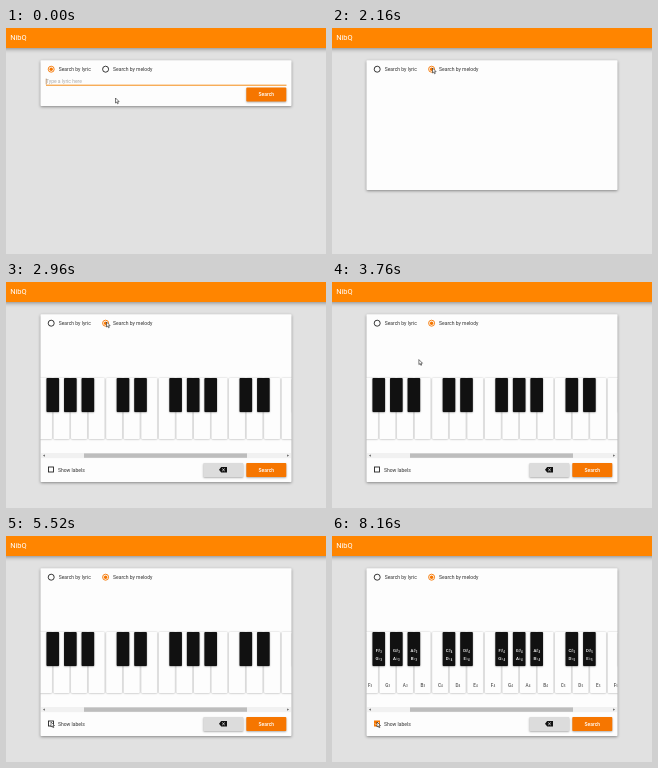
Animation, 320 px wide and 226 px high, one loop 8240 ms. Source, as an HTML page with a canvas:

```html
<!DOCTYPE html>
<html lang="en">
<head>
<meta charset="utf-8">
<title>Melody search</title>
<style>
html, body { margin: 0; width: 320px; height: 226px; overflow: hidden; background: #e1e1e1; }
canvas { display: block; width: 320px; height: 226px; }
</style>
</head>
<body>
<canvas id="stage"></canvas>
<script>
const LOOP = 8240, STEP = 80;
const ORANGE = '#f67600', INK = '#333';
const MELODY = 2160, READY = 2480, CHECKED = 5840, LABELED = 5920;
const KEY = 17.55, KEY_TOP = 96, KEY_BOTTOM = 157;
const NOTES = ['C', 'D', 'E', 'F', 'G', 'A', 'B'];

// Pointer tip: time, x, y
const PATH = [
  [0, 109.5, 70], [640, 109.5, 70], [1280, 102.3, 45.5], [1600, 100.5, 40],
  [3440, 100.5, 40], [4400, 48, 185], [4720, 48, 185], [5280, 45, 186]
];

const canvas = document.getElementById('stage');
const c = canvas.getContext('2d');
const dpr = Math.max(1, window.devicePixelRatio || 1);
canvas.width = 320 * dpr;
canvas.height = 226 * dpr;

const clamp = v => Math.max(0, Math.min(1, v));
const ease = v => v * v * (3 - 2 * v);

function rect(x, y, w, h, fill) {
  c.fillStyle = fill;
  c.fillRect(x, y, w, h);
}

function raised(x, y, w, h, fill, blur = 3, alpha = 0.4, dy = 1) {
  c.save();
  c.shadowColor = `rgba(0,0,0,${alpha})`;
  c.shadowBlur = blur * dpr;
  c.shadowOffsetY = dy * dpr;
  c.beginPath();
  c.roundRect(x, y, w, h, 0.8);
  c.fillStyle = fill;
  c.fill();
  c.restore();
}

function text(s, x, y, fill = INK, size = 5, align = 'left', weight = 400) {
  c.font = `${weight} ${size}px Roboto, sans-serif`;
  c.textAlign = align;
  c.fillStyle = fill;
  c.fillText(s, x, y);
}

function shape(points, fill, stroke, width = 0.6) {
  c.beginPath();
  points.forEach(([x, y]) => c.lineTo(x, y));
  c.closePath();
  if (fill) { c.fillStyle = fill; c.fill(); }
  if (stroke) { c.strokeStyle = stroke; c.lineWidth = width; c.stroke(); }
}

function line(points, color, width) {
  c.beginPath();
  points.forEach(([x, y]) => c.lineTo(x, y));
  c.strokeStyle = color;
  c.lineWidth = width;
  c.stroke();
}

function radio(x, label, on) {
  c.beginPath();
  c.arc(x, 41.2, 3, 0, 7);
  c.strokeStyle = on ? ORANGE : '#222';
  c.lineWidth = 0.9;
  c.stroke();
  if (on) {
    c.beginPath();
    c.arc(x, 41.2, 1.7, 0, 7);
    c.fillStyle = ORANGE;
    c.fill();
  }
  text(label, x + 7.5, 43.2);
}

function searchButton(y) {
  raised(240.3, y, 40, 14, ORANGE, 2, 0.3);
  text('Search', 260.3, y + 8.8, '#fff', 5, 'center', 500);
}

function lyricForm(t) {
  const fade = clamp((t - 160) / 320);
  text('Type a lyric here', 40, 55, '#aaa');
  rect(40, 56.7, 240.5, 1 - 0.3 * fade, `rgba(246,140,20,${1 - 0.25 * fade})`);
  if (t % 1060 < 530) rect(39.8, 50.6, 0.7, 5.8, '#a8733c');
  searchButton(59.6);
}

function noteLabel(letter, sign, octave, x, y, fill, size) {
  const name = letter + sign;
  c.font = `500 ${size}px Roboto, sans-serif`;
  const w = c.measureText(name).width;
  text(name, x - w / 2 - 0.8, y, fill, size, 'left', 500);
  text(octave, x + w / 2 - 0.7, y + 0.9, fill, size * 0.65, 'left', 500);
}

function piano(alpha, shift, labeled) {
  c.save();
  c.beginPath();
  c.rect(34.5, 90, 251, 78);
  c.clip();
  c.globalAlpha = alpha;
  for (let k = -1; k < 16; k++) {
    const x = 38 + shift + k * KEY;
    raised(x - KEY / 2 + 0.7, KEY_TOP, KEY - 1.4, KEY_BOTTOM - KEY_TOP, '#fdfdfd', 1.8, 0.35, 0.3);
    if (labeled) noteLabel(NOTES[(k + 10) % 7], '', 3 + Math.floor((k + 3) / 7), x, 150.5, '#555', 4.6);
  }
  for (let k = -1; k < 15; k++) {
    const n = (k + 10) % 7;
    if (n === 2 || n === 6) continue;
    const x = 38 + shift + (k + 0.5) * KEY;
    const octave = 3 + Math.floor((k + 3) / 7);
    raised(x - 6.3, KEY_TOP, 12.6, 34, '#111', 1.5, 0.45, 0.5);
    if (labeled) {
      noteLabel(NOTES[n], '♯', octave, x, 116.3, '#fff', 4.3);
      noteLabel(NOTES[n + 1], '♭', octave, x, 123.8, '#fff', 4.3);
    }
  }
  c.restore();
}

function footer(checked) {
  rect(35, 171, 250, 5.2, '#f1f1f1');
  rect(78, 171.4, 163, 4.4, '#bdbdbd');
  shape([[37, 173.6], [38.8, 172.4], [38.8, 174.8]], '#555');
  shape([[283, 173.6], [281.2, 172.4], [281.2, 174.8]], '#555');

  if (checked) {
    rect(42, 184.5, 6, 6, ORANGE);
    line([[43.1, 187.5], [44.5, 189], [47, 186]], '#fff', 0.8);
  } else {
    c.strokeStyle = '#222';
    c.lineWidth = 0.9;
    c.strokeRect(42.5, 185, 5, 5);
  }
  text('Show labels', 52, 189.5);

  raised(197.3, 181, 40, 14, '#dcdcdc', 2, 0.3);
  shape([[213, 187.8], [215.2, 185], [221, 185], [221, 190.6], [215.2, 190.6]], '#111');
  line([[216.2, 186.5], [218.8, 189.1]], '#fff', 0.7);
  line([[218.8, 186.5], [216.2, 189.1]], '#fff', 0.7);
  searchButton(181);
}

function pointer(t) {
  let i = PATH.length - 1;
  while (PATH[i][0] > t) i--;
  const a = PATH[i], b = PATH[i + 1] || a;
  const p = ease(clamp((t - a[0]) / (b[0] - a[0] || 1)));
  c.save();
  c.translate(a[1] + (b[1] - a[1]) * p, a[2] + (b[2] - a[2]) * p);
  shape([[0, 0], [0, 5], [1.2, 4], [2, 5.8], [2.8, 5.4], [2, 3.7], [3.6, 3.6]], '#fff', '#222');
  c.restore();
}

function draw(t) {
  const melody = t >= MELODY, ready = t >= READY;
  c.setTransform(dpr, 0, 0, dpr, 0, 0);
  rect(0, 0, 320, 226, '#e1e1e1');
  raised(-4, -4, 328, 24, '#ff8500', 4, 0.4);
  text('NibQ', 4.2, 12, '#fff', 7.5);

  const bottom = ready ? 200 : melody ? 162 : 78;
  raised(34.5, 32.3, 251, bottom - 32.3, '#fdfdfd');
  radio(45.2, 'Search by lyric', !melody);
  radio(99.6, 'Search by melody', melody);

  if (melody) {
    piano(clamp((t - MELODY) / (READY - MELODY)), ready ? 0 : 4, t >= LABELED);
    if (ready) footer(t >= CHECKED);
  } else {
    lyricForm(t);
  }
  pointer(t);
}

const start = performance.now();
function tick() {
  const t = (performance.now() - start) % LOOP;
  draw(Math.floor(t / STEP) * STEP);
  requestAnimationFrame(tick);
}
tick();
</script>
</body>
</html>
```
